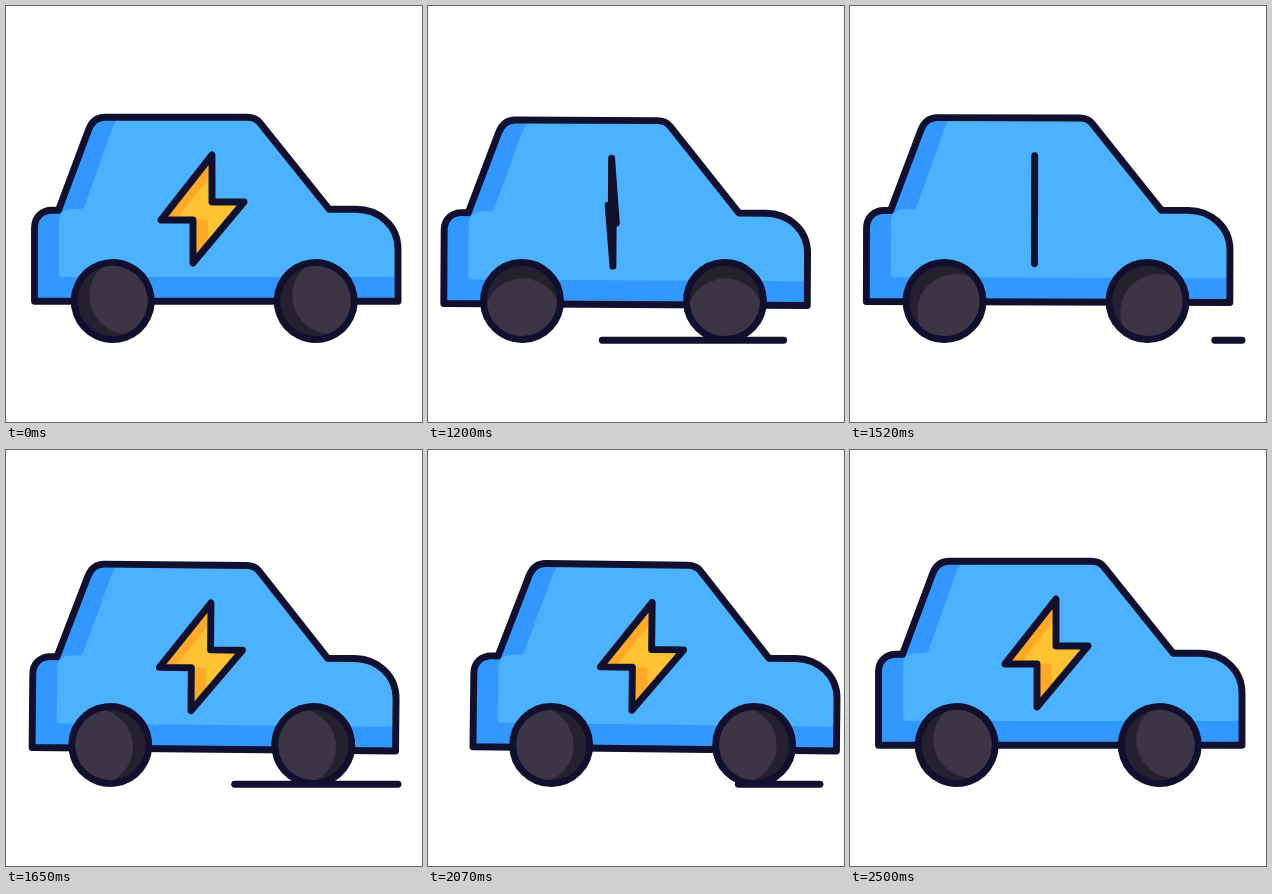
Recreate the animation shown at these times as an HTML page with a canvas. Size 416x416 px, loop 2520 ms.

```html
<!DOCTYPE html>
<html lang="en">
<head>
<meta charset="utf-8">
<title>Electric car</title>
<style>
  html, body { margin: 0; width: 100%; height: 100%; overflow: hidden; background: #fff; }
  canvas { display: block; width: 416px; height: 416px; }
</style>
</head>
<body>
<canvas id="stage" width="416" height="416"></canvas>
<script>
const ctx = document.getElementById('stage').getContext('2d');

const LOOP = 2520, REST = 1000, DRIVE = 1500, BOUNCE = 500, STEP = 25;
const INK = '#11102f', BLUE = '#4cb2ff', DEEP_BLUE = '#3298ff';
const YELLOW = '#ffc233', ORANGE = '#ffa928', TYRE = '#3b3546', DARK_TYRE = '#26212e';
const STROKE = 6.9;
const AXLE_Y = 295, AXLES = [106.7, 309.7];
const PIVOT = { x: 210, y: AXLE_Y }, BOLT_CENTER = { x: 196.5, y: 203 };
const ROAD = { left: 29, right: 392, y: 334.3 };

const body = new Path2D('M28.5 295.3V222C28.5 211 36 204.3 46 204.3H52.5L82.5 124C85.5 116 91 111.3 99 111.3' +
  'H241C246 111.3 251 113 254 117L323.3 203.3H350C373 203.3 392 220 392 243V295.3Z');
const bodyLight = new Path2D('M400 271H56Q53 271 53 268V216C53 208 58 203 66 203H74Q78 203 79 199' +
  'L106 123Q109 114 117 108H400Z');
const bolt = new Path2D('M206 149V196H238L187 257V214H155Z');
const tyre = new Path2D();
tyre.arc(0, 0, 38.5, 0, Math.PI * 2);

// Each key is [time, value]
const shiftKeys = [[0, 0], [333, -19.6], [1000, 17.5], [1500, 0]];
const tiltKeys = [[0, 0], [83, 0.7], [417, -0.72], [500, 0]];
const sinkKeys = [[0, 0], [100, 4.2], [375, 0.9], [500, 0]];
const flipKeys = [[0, 1], [375, -1], [400, -1], [650, 1]];

const clamp = v => Math.min(1, Math.max(0, v));
const smooth = u => u * u * (3 - 2 * u);
const radians = deg => deg * Math.PI / 180;

function track(keys, t) {
  for (let i = 1; i < keys.length; i++) {
    const [t0, a] = keys[i - 1], [t1, b] = keys[i];
    if (t <= t1) return a + (b - a) * smooth(clamp((t - t0) / (t1 - t0)));
  }
  return keys[keys.length - 1][1];
}

// Cubic bezier easing with handles (0.18, 0) and (0.62, 1)
function spinEase(u) {
  let lo = 0, hi = 1;
  for (let i = 0; i < 24; i++) {
    const s = (lo + hi) / 2, r = 1 - s;
    const x = 3 * r * r * s * 0.18 + 3 * r * s * s * 0.62 + s * s * s;
    if (x < u) lo = s; else hi = s;
  }
  return smooth(lo);
}

function shaded(path, base, drawLight) {
  ctx.save();
  ctx.clip(path);
  ctx.fillStyle = base;
  ctx.fill(path);
  drawLight();
  ctx.restore();
  ctx.stroke(path);
}

function drawRoad(phase) {
  const span = ROAD.right - ROAD.left, travel = BOUNCE * 2 / 3;
  const head = ROAD.right - span * clamp(phase / travel);
  const tail = ROAD.right - span * clamp((phase - BOUNCE / 3) / travel);
  if (tail - head < 0.01) return;
  ctx.beginPath();
  ctx.moveTo(head, ROAD.y);
  ctx.lineTo(tail, ROAD.y);
  ctx.stroke();
}

function drawBody(tilt, sink, flip) {
  ctx.save();
  ctx.translate(PIVOT.x, PIVOT.y + sink);
  ctx.rotate(radians(tilt));
  ctx.translate(-PIVOT.x, -PIVOT.y);
  shaded(body, DEEP_BLUE, () => {
    ctx.fillStyle = BLUE;
    ctx.fill(bodyLight);
  });

  // The shade stays on the left side whichever way the bolt faces
  const flipped = new Path2D(), shifted = new Path2D();
  flipped.addPath(bolt, new DOMMatrix([flip, 0, 0, 1, BOLT_CENTER.x * (1 - flip), 0]));
  shifted.addPath(flipped, new DOMMatrix([1, 0, 0, 1, 15 * Math.abs(flip), 0]));
  shaded(flipped, ORANGE, () => {
    ctx.fillStyle = YELLOW;
    ctx.fill(shifted);
  });
  ctx.restore();
}

function drawWheel(x, spin) {
  ctx.save();
  ctx.translate(x, AXLE_Y);
  ctx.rotate(radians(spin - 20));
  shaded(tyre, DARK_TYRE, () => {
    ctx.translate(16, 0);
    ctx.fillStyle = TYRE;
    ctx.fill(tyre);
  });
  ctx.restore();
}

function draw(now) {
  const time = Math.floor((now % LOOP) / 10) * 10;
  const stepped = Math.floor((time + 5) / STEP) * STEP;
  const t = Math.min(DRIVE, Math.max(0, stepped - REST));
  const phase = t % BOUNCE;

  ctx.fillStyle = '#fff';
  ctx.fillRect(0, 0, 416, 416);
  ctx.strokeStyle = INK;
  ctx.lineWidth = STROKE;
  ctx.lineCap = ctx.lineJoin = 'round';

  drawRoad(phase);
  ctx.save();
  ctx.translate(track(shiftKeys, t), 0);
  drawBody(track(tiltKeys, phase), track(sinkKeys, phase), track(flipKeys, t));
  const spin = 1080 * spinEase(t / DRIVE);
  AXLES.forEach(x => drawWheel(x, spin));
  ctx.restore();
}

let start;
function tick(now) {
  start ??= now;
  draw(now - start);
  requestAnimationFrame(tick);
}
draw(0);
requestAnimationFrame(tick);
</script>
</body>
</html>
```
